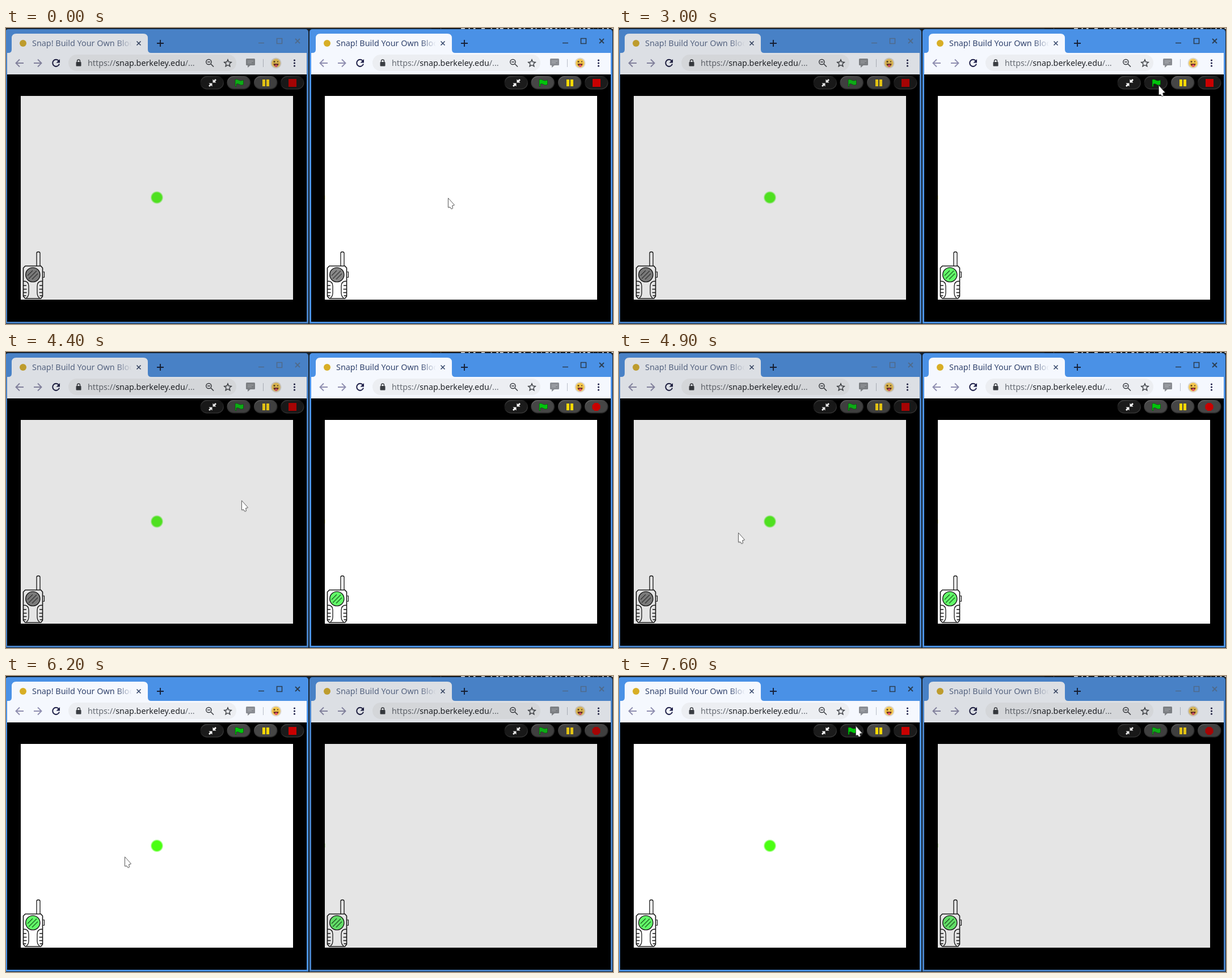
Animation, 1070 px wide and 523 px high, one loop 8000 ms. Source, as an HTML page with a canvas:

```html
<!DOCTYPE html>
<html lang="en">
<head>
<meta charset="utf-8">
<title>Two browser windows</title>
<style>
html, body { margin: 0; width: 100%; height: 100%; overflow: hidden; background: #17212b; }
canvas { position: absolute; top: 0; left: 0; }
#right { left: 534px; }
</style>
</head>
<body>
<canvas id="back" width="1070" height="523"></canvas>
<canvas id="left" width="534" height="523"></canvas>
<canvas id="right" width="536" height="523"></canvas>
<canvas id="top" width="1070" height="523"></canvas>
<script>
const LOOP = 8000, TICK = 100, FOCUS = 5100;
const FONT = '"Noto Sans", "Open Sans", sans-serif';
const NAVY = '#20214a', INK = '#3a3d42';
const canvas = id => document.getElementById(id);
const layer = id => canvas(id).getContext('2d');
const top2d = layer('top');
let g;

// time, x, y of the pointer tip
const PATH = [
  [0, 779, 300], [800, 779, 300], [900, 778, 300], [2100, 778, 300],
  [2200, 821, 262], [2300, 880, 190], [2400, 916, 138], [2600, 916, 138],
  [2700, 951, 102], [2900, 951, 102], [3000, 951, 101], [3800, 951, 101],
  [3900, 860, 142], [4300, 500, 237], [4500, 330, 287], [4700, 229, 312],
  [4800, 217, 316], [4900, 210, 319], [5000, 210, 319], [5100, 209, 319],
  [6800, 209, 319], [7000, 226, 301], [7300, 340, 175], [7500, 402, 106],
  [7600, 417, 88], [LOOP, 417, 88]
];

const ramp = (t, a, b) => Math.min(1, Math.max(0, (t - a) / (b - a)));

function pointerAt(t) {
  const i = PATH.findIndex(k => k[0] > t);
  const a = PATH[i - 1], b = PATH[i], u = ramp(t, a[0], b[0]);
  return { x: Math.round(a[1] + (b[1] - a[1]) * u), y: Math.round(a[2] + (b[2] - a[2]) * u) };
}

function rect(x, y, w, h, color) {
  g.fillStyle = color;
  g.fillRect(x, y, w, h);
}

function pill(x, y, w, h, r, fill) {
  g.beginPath();
  g.roundRect(x, y, w, h, r);
  g.fillStyle = fill;
  g.fill();
}

function disc(x, y, r, fill) {
  g.beginPath();
  g.arc(x, y, r, 0, 7);
  g.fillStyle = fill;
  g.fill();
}

function poly(points, fill) {
  g.beginPath();
  points.forEach(p => g.lineTo(p[0], p[1]));
  g.closePath();
  g.fillStyle = fill;
  g.fill();
}

function line(d, color, width = 1) {
  g.strokeStyle = color;
  g.lineWidth = width;
  g.stroke(new Path2D(d));
}

function text(s, x, y, size, color) {
  g.font = size + 'px ' + FONT;
  g.fillStyle = color;
  g.fillText(s, x, y);
  return g.measureText(s).width;
}

function drawTabs(active) {
  const bar = '#f5f8fe';
  g.fillStyle = bar;
  g.fill(new Path2D('M4 44Q10 44 10 38V18Q10 10 18 10H242Q250 10 250 18V38Q250 44 256 44Z'));
  rect(2, 44, 528, 38, bar);
  disc(30, 27, 6, '#d8ae25');

  const fade = g.createLinearGradient(194, 0, 222, 0);
  const rgb = active ? '48,66,108' : '92,110,146';
  fade.addColorStop(0, `rgba(${rgb},1)`);
  fade.addColorStop(1, `rgba(${rgb},0)`);
  g.save();
  g.beginPath();
  g.rect(44, 12, 178, 30);
  g.clip();
  text('Snap! Build Your Own Blocks', 46, 32, 14.4, fade);
  g.restore();

  line('M230.5 23.5L237.5 30.5M237.5 23.5L230.5 30.5', '#36486c', 1.6);
  line('M266 27H278M272 21V33', '#17223a', 1.9);
  const icon = active ? '#2b3d50' : '#55779f';
  line('M445 26.5H455M477.5 18.5H486.5V27.5H477.5Z', icon, 1.6);
  line('M510 19L518 27M518 19L510 27', icon, 1.8);
}

function drawToolbar() {
  const pale = '#8f8eb0';
  line('M31 62H18M24 55.5L17.5 62L24 68.5', pale, 1.9);
  line('M49 62H62M56 55.5L62.5 62L56 68.5', pale, 1.9);
  line('M93 58.2A6 6 0 1 0 94 63.5', NAVY, 2);
  poly([[95, 55], [95, 61.5], [88.5, 61.5]], NAVY);

  pill(110, 47, 296, 29, 14.5, '#eceef2');
  pill(123.5, 60, 9, 7.5, 1, INK);
  line('M125.5 61V58.5A2.5 2.5 0 0 1 130.5 58.5V61', INK, 1.4);
  const w = text('https://', 144, 67, 14.3, '#666b73');
  const host = text('snap.berkeley.edu', 144 + w, 67, 14.3, '#202328');
  text('/...', 144 + w + host, 67, 14.3, '#666b73');

  line('M362 60A4.6 4.6 0 1 1 352.8 60A4.6 4.6 0 1 1 362 60M361 63.5L366 68.5M355 60H360', INK, 1.5);
  const star = [];
  for (let i = 0; i < 10; i++) {
    const a = Math.PI * (i / 5 - .5), r = i % 2 ? 3 : 6.6;
    star.push((391 + r * Math.cos(a)).toFixed(2) + ' ' + (62.5 + r * Math.sin(a)).toFixed(2));
  }
  line('M' + star.join('L') + 'Z', INK, 1.4);

  pill(423, 54, 16, 12, 1.5, '#8a8d93');
  poly([[426, 65], [432, 65], [426, 70]], '#8a8d93');
  line('M426 58.5H436M426 61.5H433', '#b4b7bc');
  line('M453.5 55V69', '#b9bec8');

  disc(476, 62, 9.5, '#ddd8cf');
  disc(476, 62, 7.6, '#f3c64d');
  disc(473, 59.5, 1.5, '#59421f');
  disc(479, 59.5, 1.1, '#59421f');
  g.beginPath();
  g.arc(476, 63, 4.5, 0, Math.PI);
  g.fillStyle = '#6a3024';
  g.fill();
  pill(474, 64.5, 4.5, 4.5, 2, '#e7546b');
  [57, 62, 67].forEach(y => disc(508.5, y, 1.6, NAVY));
}

function button(x, light) {
  const edge = g.createLinearGradient(x, 85, x + 6, 109);
  edge.addColorStop(0, light ? '#747474' : '#4c4c4c');
  edge.addColorStop(.5, light ? '#404040' : '#161616');
  edge.addColorStop(1, light ? '#2a2a2a' : '#333');
  pill(x, 85, 41.5, 23.5, 11.7, edge);
  pill(x + 1.5, 86.5, 38.5, 20.5, 10.2, light ? '#464646' : '#1b1b1b');
}

function drawControls(s) {
  button(342.5, false);
  button(389.5, !s.hover);
  button(437, true);
  button(484, s.running);

  poly([[364.5, 96.5], [364.5, 90.5], [366.5, 92.5], [369, 90], [371, 92], [368.5, 94.5], [370.5, 96.5]], '#fff');
  poly([[363.5, 97.5], [363.5, 103.5], [361.5, 101.5], [359, 104], [357, 102], [359.5, 99.5], [357.5, 97.5]], '#fff');

  const flag = new Path2D('M404 91Q408 90 411 92.5Q414 94 418.5 92V100Q414 102 411 99.5Q409 98 406 99V103.5H404Z');
  g.fillStyle = '#00c40c';
  g.fill(flag);
  g.strokeStyle = 'rgba(0,75,0,.7)';
  g.lineWidth = .8;
  g.stroke(flag);

  rect(452, 91, 5, 12, '#ffd800');
  rect(459, 91, 5, 12, '#ffd800');
  if (s.running) {
    const oct = [];
    for (let i = 0; i < 8; i++) {
      const a = Math.PI * (i + .5) / 4;
      oct.push([504.5 + 7.6 * Math.cos(a), 97 + 7.6 * Math.sin(a)]);
    }
    poly(oct, '#c80000');
  } else {
    rect(498, 90, 14, 14, '#c80000');
  }
}

function drawRadio(lit) {
  const ink = '#161616';
  line('M54 420V398Q54 395.5 57 395.5Q60 395.5 60 398V420', ink, 1.3);
  line('M64.5 431H67.5V440.5H64.5', ink, 1.2);
  line('M34 420.5H61.5L64.5 424V474L61.5 478H34L30.5 474V424Z', ink, 1.6);
  line('M31 447.5H34Q40 449 40 456V468Q40 474 35.5 477.5', ink, 1.3);
  line('M64 447.5H61Q55 449 55 456V468Q55 474 59.5 477.5', ink, 1.3);
  line('M31 455H36M31 461.5H36.5M31 467.5H36.5M31 473H35.5M64 455H59M64 461.5H58.5M64 467.5H58.5M64 473H59.5', ink, 1.4);
  disc(47.3, 436, 12.6, lit ? '#62fa68' : '#888');
  g.strokeStyle = ink;
  g.lineWidth = 1.4;
  g.stroke();
  line('M38 437.5L47 428.5M40 443L54 429M46 444L56 434', lit ? '#1c5d20' : '#3a3a3a', 1.3);
}

function drawBall(y) {
  const soft = g.createRadialGradient(266, y, 0, 266, y, 11.5);
  soft.addColorStop(0, 'rgba(75,255,18,1)');
  soft.addColorStop(.74, 'rgba(75,255,18,1)');
  soft.addColorStop(1, 'rgba(75,255,18,0)');
  disc(266, y, 11.5, soft);
}

function drawWindow(id, shift, s) {
  const el = canvas(id);
  g = layer(id);
  g.setTransform(1, 0, 0, 1, 0, 0);
  g.clearRect(0, 0, el.width, el.height);
  g.translate(shift, 0);
  pill(-1, 2, 534, 520, [5, 5, 0, 0], '#4a91e6');
  rect(2, 82, 528, 437, '#000');
  drawTabs(s.active);
  drawToolbar();
  drawControls(s);
  rect(26, 120, 480, 360, '#fff');
  drawRadio(s.lit);
  if (s.ball) drawBall(s.ball);
  else rect(26, 296, 1, 7, s.active ? '#fbf6c0' : '#d3f7bd');
  const b = 1 - .102 * s.dim;
  el.style.filter = s.dim ? `brightness(${b}) saturate(${1 - .1 * s.dim})` : 'none';
}

function drawBack() {
  g = layer('back');
  rect(0, 0, 1070, 523, '#17212b');
  rect(750, 0, 320, 1.5, '#e4e6e8');
  let seed = 7;
  const rnd = () => (seed = seed * 16807 % 2147483647) / 2147483647;
  for (let x = 750; x < 1070; x += 4 + rnd() * 9) {
    rect(x, 0, x < 790 ? 12 : 2 + rnd() * 6, 2, '#11161b');
  }
}

function drawPointer(p) {
  g = top2d;
  g.clearRect(0, 0, 1070, 523);
  g.save();
  g.translate(p.x + .5, p.y + .5);
  const arrow = new Path2D('M0 0V16.5L3.5 16L5.5 19L8 18L7 13.5L11 12.3Z');
  g.shadowColor = 'rgba(0,0,0,.25)';
  g.shadowBlur = 2;
  g.shadowOffsetY = 1;
  g.fillStyle = '#fff';
  g.fill(arrow);
  g.shadowColor = 'transparent';
  g.strokeStyle = '#606060';
  g.lineWidth = 1;
  g.lineJoin = 'round';
  g.stroke(arrow);
  g.restore();
}

function render(t) {
  const p = pointerAt(t);
  const overFlag = dx => p.x >= 389 + dx && p.x <= 431 + dx && p.y >= 85 && p.y <= 108;
  const pressed = t >= 3200 && t < 3300;
  drawWindow('left', 0, {
    active: t >= FOCUS, dim: 1 - ramp(t, 5000, 5350), hover: overFlag(0),
    running: false, lit: t >= 6100, ball: t < 6200 ? 299.5 : 300
  });
  drawWindow('right', 2, {
    active: t < FOCUS, dim: ramp(t, 5030, 5600), hover: overFlag(536) && !pressed,
    running: t >= 3300, lit: t >= 1600, ball: 0
  });
  drawPointer(p);
}

drawBack();
let last = -1;
const start = performance.now();
function frame(now) {
  const t = Math.floor((Math.max(0, now - start) % LOOP) / TICK) * TICK;
  if (t !== last) render(last = t);
  requestAnimationFrame(frame);
}
render(0);
requestAnimationFrame(frame);
</script>
</body>
</html>
```
